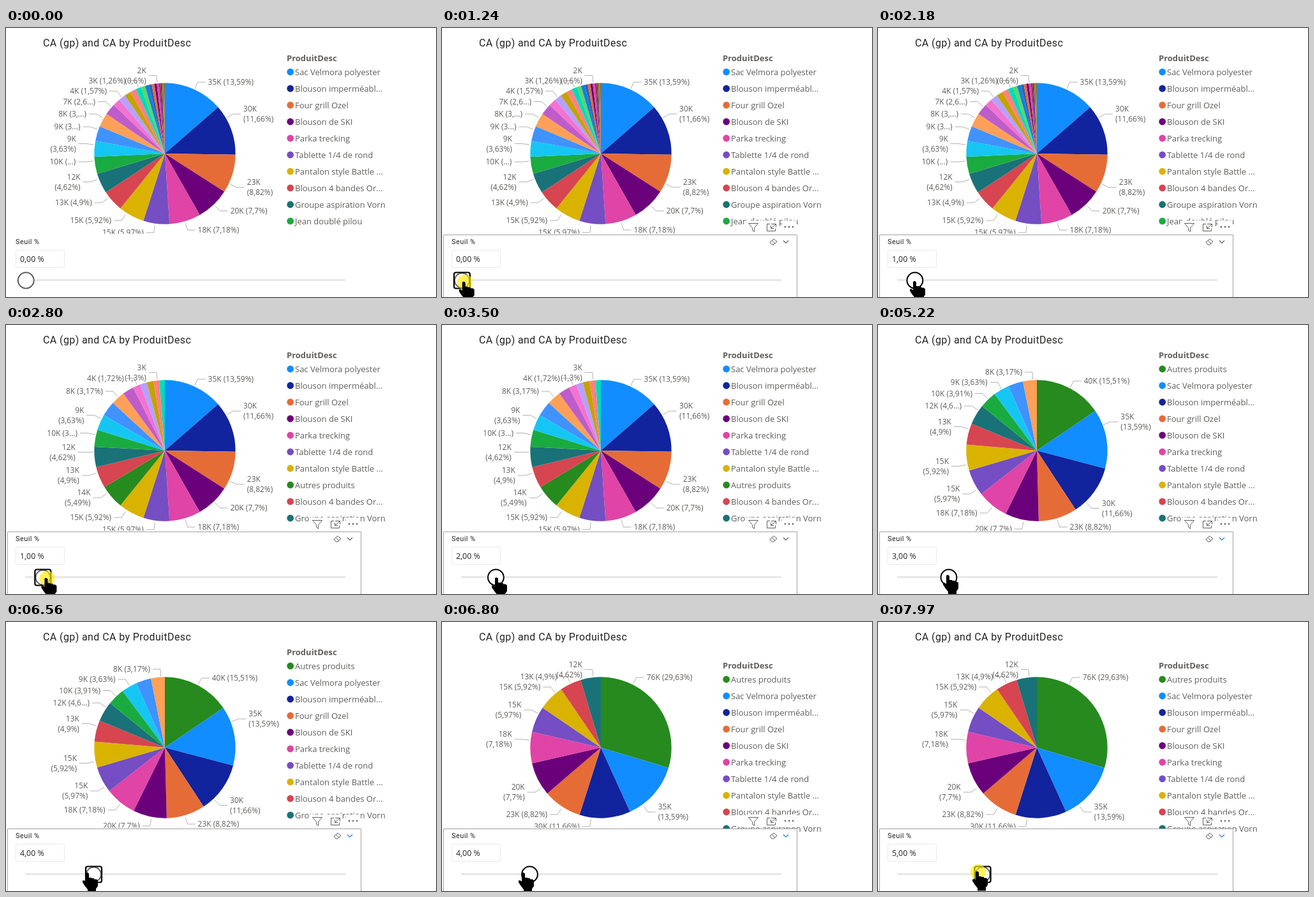
An HTML page with a canvas for the animation above (8000 ms loop, 674 by 422 pixels).

```html
<!DOCTYPE html>
<html lang="fr">
<head>
<meta charset="utf-8">
<style>
  html, body { margin: 0; width: 100%; height: 100%; overflow: hidden; background: #fff; }
  canvas { display: block; }
</style>
</head>
<body>
<canvas id="stage" width="674" height="422"></canvas>
<script>
const ctx = document.getElementById('stage').getContext('2d');
const LOOP = 8000, GREY = '#605e5c', DARK = '#252423';
const SANS = '"Open Sans", "Noto Sans", sans-serif', TITLE = 'Roboto, sans-serif';

const products = [
  [13.59, '#118dff', 'Sac Velmora polyester'],
  [11.66, '#12239e', 'Blouson imperméabl...'],
  [8.82, '#e66c37', 'Four grill Ozel'],
  [7.7, '#6b007b', 'Blouson de SKI'],
  [7.18, '#e044a7', 'Parka trecking'],
  [5.97, '#744ec2', 'Tablette 1/4 de rond'],
  [5.92, '#d9b300', 'Pantalon style Battle ...'],
  [4.9, '#d64550', 'Blouson 4 bandes Or...'],
  [4.62, '#197278', 'Groupe aspiration Vorn'],
  [3.91, '#1aab40', 'Jean doublé pilou'],
  [3.63, '#15c6f4'], [3.42, '#4092ff'], [3.17, '#ffa058'], [2.61, '#be5dc9'],
  [1.72, '#f472d0'], [1.57, '#b5a1ff'], [1.56, '#c4a200'], [1.3, '#ff8080'],
  [1.26, '#00dbbc'], [.95, '#5bd667'], [.85, '#0f7fe0'], [.7, '#3b5fae'],
  [.6, '#e66c37'], [.55, '#6b007b'], [.5, '#e044a7'], [.4, '#8a2f5c'],
  [.35, '#5a4a8a'], [.25, '#a08000'], [.2, '#c0603a'], [.14, '#8a6d00']
];

// Callouts per view: "centre-y text", "|" breaks the line
const wideRight = ['85 35K (13,59%)', '135 30K|(11,66%)', '250 23K|(8,82%)', '287 20K (7,7%)', '317 18K (7,18%)'];
const views = [
  { from: 0, min: 0, right: wideRight,
    left: ['321 15K (5,97%)', '302 15K (5,92%)', '274 13K (4,9%)', '241.5 12K|(4,62%)', '210 10K (...)',
      '181.5 9K|(3,63%)', '155 9K (3...)', '135 8K (3,...)', '115.5 7K (2,6...)', '99 4K (1,57%)',
      '82.5 3K (1,26%)', '74.5 2K|(0,6%)'] },
  { from: 2260, min: 1, right: wideRight,
    left: ['321 15K (5,97%)', '302 15K (5,92%)', '271 14K|(5,49%)', '236 13K|(4,9%)', '199.5 12K|(4,62%)',
      '169.5 10K (3...)', '141.5 9K|(3,63%)', '104 8K (3,17%)', '83.5 4K (1,72%)', '74.5 3K|(1,3%)'] },
  { from: 3580, min: 2,
    right: ['85 35K (13,59%)', '136 33K|(12,9%)', '273 30K|(11,66%)', '309 23K (8,82%)'],
    left: ['322 20K (7,7%)', '297.5 18K (7,18%)', '272 15K|(5,97%)', '231 15K|(5,92%)', '179.5 13K|(4,9%)',
      '144 12K|(4,62%)', '118 10K (3,9...)', '97.5 9K (3,63%)', '77.5 8K (3,17%)'] },
  { from: 5210, min: 3,
    right: ['88 40K (15,51%)', '152 35K|(13,59%)', '287.5 30K|(11,66%)', '317 23K (8,82%)'],
    left: ['320 20K (7,7%)', '295 18K (7,18%)', '265 15K|(5,97%)', '221.5 15K|(5,92%)', '159.5 13K|(4,9%)',
      '127 12K (4,6...)', '107.5 10K (3,91%)', '90 9K (3,63%)', '74 8K (3,17%)'] },
  { from: 6800, min: 4, scroll: 21,
    right: ['87 76K (29,63%)', '298 35K|(13,59%)'],
    left: ['321 30K (11,66%)', '302 23K (8,82%)', '267 20K|(7,7%)', '184 18K|(7,18%)', '138 15K|(5,97%)',
      '102 15K (5,92%)', '85.5 13K (4,9%)', '74.5 12K|(4,62%)'] }
];
for (const view of views) {
  view.slices = products.filter(p => p[0] >= view.min);
  const rest = 100 - view.slices.reduce((sum, p) => sum + p[0], 0);
  if (rest > 1) view.slices.push([rest, '#268a1e', 'Autres produits']);
  view.slices.sort((a, b) => b[0] - a[0]);
}

// Pointer path: time, x, y of the fingertip
const path = [
  [210, 24, 430], [440, 28, 408], [680, 28, 408], [840, 26, 398], [1010, 26, 398], [1640, 47, 397],
  [2020, 47, 397], [2180, 57, 397], [2650, 57, 397], [3430, 85, 396], [4120, 85, 396], [4280, 94.5, 397],
  [4350, 94.5, 397], [4590, 109, 392], [5620, 109, 392], [6250, 127, 393], [7500, 127, 393], [7970, 155, 391]
];
const pressed = [[840, 1870], [2650, 3430], [3970, 4820], [5620, 6490], [7270, LOOP]];
const focused = [[1010, 2020], [2650, 3430], [4120, 4820], [5620, 6800], [7270, LOOP]];
const within = (spans, t) => spans.some(([a, b]) => t >= a && t < b);

function pointerAt(t) {
  const i = path.findIndex(key => key[0] > t);
  if (i === 0) return path[0].slice(1);
  if (i < 0) return path[path.length - 1].slice(1);
  const [t0, x0, y0] = path[i - 1], [t1, x1, y1] = path[i];
  const k = (t - t0) / (t1 - t0);
  return [x0 + (x1 - x0) * k, y0 + (y1 - y0) * k];
}

function text(str, x, y, size, { color = GREY, family = SANS, weight = 400, align = 'left', spacing = 0 } = {}) {
  ctx.font = `${weight} ${size}px ${family}`;
  ctx.letterSpacing = spacing + 'px';
  ctx.textAlign = align;
  ctx.fillStyle = color;
  ctx.fillText(str, x, y + size * .36);
}

function stroke(d, color, width = 1) {
  ctx.strokeStyle = color;
  ctx.lineWidth = width;
  ctx.stroke(new Path2D(d));
}

function disc(x, y, r, color) {
  ctx.fillStyle = color;
  ctx.beginPath();
  ctx.arc(x, y, r, 0, 7);
  ctx.fill();
}

function callout(entry, side) {
  const [, y, label] = entry.match(/^(\S+) (.*)$/);
  const dy = y - 198, reach = 124.2;
  const dx = side * Math.sqrt(Math.max(0, reach * reach - dy * dy));
  const elbow = 249 + dx, k = 113 / reach;
  stroke(`M${249 + dx * k} ${198 + dy * k}L${elbow} ${y}h${side * 12}`, '#b3b0ad');
  const lines = label.split('|');
  lines.forEach((line, i) => text(line, elbow + side * 16, +y + (i - (lines.length - 1) / 2) * 16, 12,
    { align: side > 0 ? 'left' : 'right' }));
}

function drawChart(view) {
  ctx.save();
  ctx.beginPath();
  ctx.rect(0, 0, 436, 323);
  ctx.clip();
  text('CA (gp) and CA by ProduitDesc', 58, 23, 16, { color: DARK, family: TITLE, spacing: .4 });
  let angle = -Math.PI / 2;
  for (const [share, color] of view.slices) {
    const end = angle + share / 50 * Math.PI;
    ctx.fillStyle = color;
    ctx.beginPath();
    ctx.moveTo(249, 197);
    ctx.arc(249, 197, 110.7, angle, end);
    ctx.fill();
    angle = end;
  }
  view.right.forEach(entry => callout(entry, 1));
  view.left.forEach(entry => callout(entry, -1));
  ctx.restore();

  const shift = view.scroll || 0;
  text('ProduitDesc', 440, 47 + shift, 13, { weight: 700 });
  view.slices.slice(0, 10).forEach(([, color, name], i) => {
    const y = 69 + shift + i * 26;
    disc(445.7, y, 5.4, color);
    text(name, 453, y, 13);
  });
}

function drawHeader(t) {
  ctx.globalAlpha = Math.max(0, Math.min(1, (t - 210) / 160 + .3)) * (t >= 210);
  ctx.fillStyle = '#fff';
  ctx.fillRect(476, 302, 50, 20);
  ctx.fillRect(533, 302, 23, 20);
  ctx.fillRect(2, 324, 555, 98);
  stroke('M2.5 422V324.5H556.5V422', '#a6a3a1');
  stroke('M480.5 306.5h15l-6 7v6l-3 -2v-4z', GREY);
  stroke('M514 307.5h-4.500v11h13v-4M516 307.500h7.500v5M523 308l-7 6M515.500 310v4.500h4.500', GREY);
  for (const x of [538, 544, 550]) disc(x, 312, 1.3, GREY);
  stroke('M514 336l6 -5l5 4l-5 5h-3zM517 333.500l5 4.500', GREY);
  stroke('M535 333.500l4 4l4 -4', t < 3580 ? GREY : '#2b7cd3', 1.2);
  ctx.globalAlpha = 1;
}

function drawSlider(t) {
  const [x, y] = pointerAt(t);
  const value = Math.max(0, Math.round((x + 2 - 31) / 26.6));
  const knob = 31.3 + value * 26.55;
  text('Seuil %', 15, 335.5, 11, { color: DARK, family: TITLE, spacing: .4 });
  stroke('M15.500 348.500h76v27h-76z', '#eaeaea');
  text(value + ',00 %', 22, 363, 12.4, { color: DARK });
  stroke('M30 395.500H532', '#e8e7e6', 3);

  const focus = within(focused, t);
  disc(knob, 396, 12.5, '#fff');
  ctx.beginPath();
  ctx.arc(knob, 396, focus ? 11.5 : 12.4, 0, 7);
  ctx.strokeStyle = focus ? '#666' : t < 440 ? GREY : '#000';
  ctx.lineWidth = 2;
  ctx.stroke();
  if (focus) {
    ctx.beginPath();
    ctx.roundRect(knob - 12.5, 383.5, 25, 25, 3);
    ctx.strokeStyle = '#000';
    ctx.lineWidth = 2.2;
    ctx.stroke();
  }
  if (t < 210) return;
  if (within(pressed, t)) disc(x + 2, y + 1, 12, 'rgba(255, 235, 0, .65)');
  ctx.save();
  ctx.translate(x, y);
  ctx.fillStyle = '#000';
  ctx.fill(new Path2D('M-2 2q0 -2 2 -2t3 2v6h4v1h4v1.500h3.500l2.500 2v9l-3 4v5h-13v-4l-4 -5l-4 -6v-3h3l2 2z'));
  ctx.restore();
}

function draw() {
  const t = performance.now() % LOOP;
  ctx.fillStyle = '#fff';
  ctx.fillRect(0, 0, 674, 422);
  drawChart(views.filter(view => t >= view.from).pop());
  drawHeader(t);
  drawSlider(t);
  requestAnimationFrame(draw);
}
draw();
</script>
</body>
</html>
```
